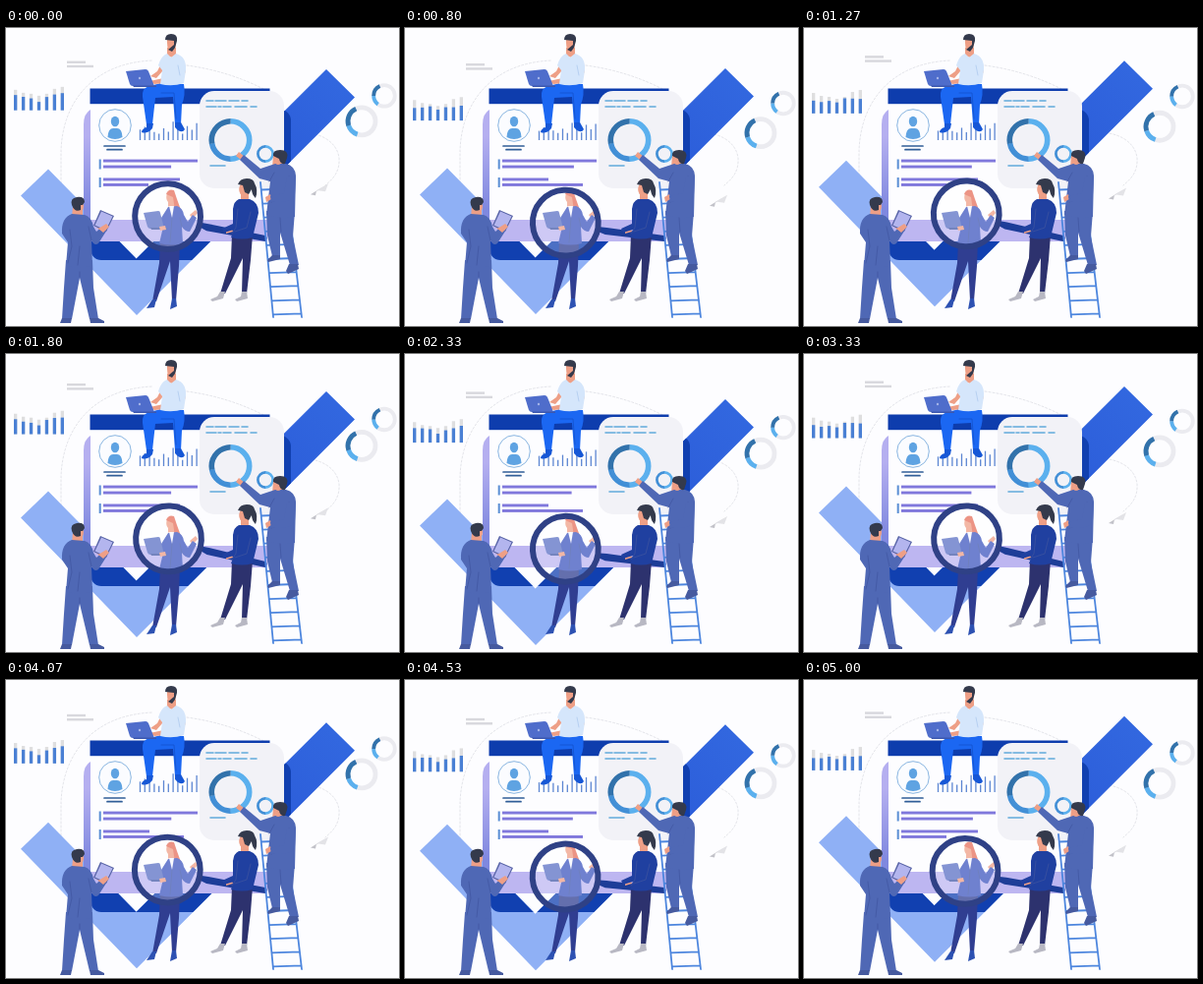
An HTML page for the animation above (5070 ms loop, 400 px wide and 303 px high).

```html
<!DOCTYPE html>
<html lang="en">
<head>
<meta charset="utf-8">
<title>Data analysis team</title>
<style>
html, body { margin: 0; width: 100%; height: 100%; overflow: hidden; background: #fdfdff; }
svg { display: block; width: 100vw; height: 100vh; }
.line { fill: none; stroke-linecap: round; stroke-linejoin: round; }
.skin { fill: #ee9f86; }
.hair { fill: #343a4c; }
.suit { fill: #4f68b5; }
.shoe { fill: #465a9f; }
.fold { fill: none; stroke: #40559f; stroke-width: .7; stroke-linecap: round; }
</style>
</head>
<body>
<svg viewBox="0 0 400 303" preserveAspectRatio="none">
  <defs>
    <linearGradient id="blue" gradientUnits="userSpaceOnUse" x1="133" y1="263" x2="340" y2="56">
      <stop offset=".25" stop-color="#8fb0f5"/><stop offset=".6" stop-color="#2b5cd9"/>
      <stop offset="1" stop-color="#3267df"/>
    </linearGradient>
    <linearGradient id="edge" x1="0" y1="0" x2="0" y2="1">
      <stop offset=".2" stop-color="#b5aff0"/><stop offset=".75" stop-color="#7f88df"/>
    </linearGradient>
    <clipPath id="onCheck">
      <path id="checkShape" d="M15 168L43 141L132.6 232L326 39.5L355 68L133 289.5Z"/>
    </clipPath>
  </defs>

  <path class="line" stroke="#dcdde4" stroke-width=".8" stroke-dasharray="2 2"
    d="M56 166V126C57 76 88 35 150 33M184 38C214 42 241 51 264 63M291 106C320 104 337 116 339 132C340 147 332 154 325 160"/>

  <use id="check" href="#checkShape" fill="url(#blue)"/>

  <g id="notes" fill="#d8d8dd">
    <rect x="62" y="33" width="19" height="2.4"/><rect x="62" y="37.2" width="27" height="2.4"/>
  </g>
  <g id="bars"></g>
  <g id="plane">
    <path fill="#e3e3e7" d="M310 174L328 163L325 171L318 170Z"/>
    <path fill="#c2c2c9" d="M310 174L328 163L316 170L315 175Z"/>
  </g>
  <g id="ringA"></g>
  <g id="ringB"></g>

  <!-- screen, casting its shadow on the check mark -->
  <g clip-path="url(#onCheck)">
    <rect x="86" y="83" width="204" height="153" rx="11" fill="#1140b0"/>
  </g>
  <path fill="url(#edge)" d="M86 83Q79 87 79 98V202Q79 214 88 217H100V83Z"/>
  <path fill="#bdb6f1" d="M86 194H266V217H88Q86 216 86 212Z"/>
  <path fill="#fdfdff" d="M86 77H268V195H86Z"/>
  <rect x="85.5" y="61.5" width="183" height="15.7" fill="#0e3dad"/>

  <circle cx="111" cy="99" r="16.3" fill="#fbfcff" stroke="#6ba2d8" stroke-width=".8"/>
  <ellipse cx="111" cy="95" rx="4.2" ry="5.2" fill="#5fa3e2"/>
  <path fill="#5fa3e2" d="M103.5 111Q104 102 109 102H113Q118 102 118.5 111Q111 115 103.5 111Z"/>
  <path class="line" stroke="#315e98" stroke-width="1.7" stroke-linecap="butt" d="M100 120H121M103 123.7H118"/>

  <g id="ticks" stroke="#5c86d2" stroke-width="1.3"></g>
  <path stroke="#5b8fd5" stroke-width="2" d="M95.7 133.5V143.5M95.7 152V162"/>
  <g id="rows" fill="#8078dc"></g>

  <rect x="197" y="64" width="86" height="99" rx="15" fill="#f2f2f7"/>
  <path class="line" stroke="#62aadb" stroke-width="1.6" stroke-linecap="butt"
    d="M204 74H211M213 74H224M227 74H237M240 74H246M204 80H214M216 80H219M221 80H229M233 80H245M249 80H255M208 140H223"/>
  <g id="ringC"></g>
  <g id="ringD"></g>

  <!-- seated man -->
  <g>
    <path fill="#1b67f2" d="M181 57Q183 68 179 78L178 98H172L170 70L152 71L149 98H143L139 70Q138 61 146 59L158 56Z"/>
    <path class="line" stroke="#1452cc" stroke-width=".8" d="M158 66H171L173 92"/>
    <path fill="#1657d6" d="M143 97H150L149 102Q144 108 138 106Q138 103 143 101ZM172 96H178L182 103Q180 107 175 104L172 101Z"/>
    <path class="skin" d="M164 20H173V28Q168 32 164 27ZM180 40L183 42Q182 52 173 55L151 57L146 54L170 49ZM158 36L160 43L153 51L147 49L154 44Z"/>
    <path fill="#d5e6fb" d="M164 26Q158 28 155 38L159 43L157 57Q169 60 181 56L183 43Q184 29 173 26L168 30Z"/>
    <path class="line" stroke="#a9c6ec" stroke-width=".7" d="M175 38L177 48"/>
    <path class="skin" d="M164 12H173Q174 21 169 24Q164 24 164 15Z"/>
    <path class="hair" d="M162 12Q162 6 168 6Q175 6 174 13L172 20L169 24L165 22L171 17V13Z"/>
    <path fill="#4f6dcb" d="M122 44L142 42Q144 42 145 44L151 59H129Q127 59 126 57Z"/>
    <path fill="#3c57ae" d="M129 58.5H153V60H130Z"/>
    <circle cx="136" cy="51" r="1.2" fill="#a3b4e8"/>
  </g>

  <!-- left man -->
  <g>
    <path class="suit" d="M61 236H88L89 264L94 296H85L75 254L67 296H57L59 264Z"/>
    <path class="shoe" d="M57 295H67L66 300H55ZM85 295H94L100 298V300H86Z"/>
    <path class="skin" d="M68 181H78V193H67ZM90 200L104 195L106 199L97 207Z"/>
    <path class="suit" d="M67 189L80 190Q87 192 89 202L92 207L99 201L103 205L94 219Q90 222 87 216L88 242Q74 245 61 242L63 218L57 209Q56 193 67 189Z"/>
    <path class="fold" d="M65 205L67 222L63 239M87 216L84 202M75 222L73 241M75 248V253"/>
    <path fill="#5763a6" d="M96 185L110 191L102 207L89 201Z"/>
    <path fill="#b3b5ee" d="M97 186.5L108.5 191.5L101.5 205.5L90.5 200.5Z"/>
    <path class="skin" d="M94 204L102 199L105 202L99 208Z"/>
    <ellipse class="skin" cx="74" cy="181" rx="5" ry="7"/>
    <path class="hair" d="M67 180Q65 173 72 172Q80 171 80 177L78 180L76 180V185Q70 188 67 180Z"/>
  </g>

  <!-- woman behind the lens -->
  <g>
    <path fill="#303e91" d="M157 217H177L176 242L173 277H169L167 237L153 278H149L156 239Z"/>
    <path fill="#2d51b2" d="M149 276H153L151 284L143 285ZM169 275H173L174 283L167 286Z"/>
    <path class="skin" d="M164 168H172V181Q168 185 165 181V177Q162 174 164 168ZM187 190L193 185L195 188L190 194Z"/>
    <path fill="#e5705c" d="M163 169Q165 163 171 165L174 174L178 185L172 186L170 172Z"/>
    <path fill="#3f57bf" d="M165 182L174 181Q180 183 181 190L185 197L190 190L194 193L187 207Q182 207 179 202L180 219Q169 222 156 219L160 202L150 205L149 201L158 193Z"/>
    <path fill="#f7f8ff" d="M166 181L171 181L169 193Z"/>
    <path class="fold" d="M169 193L167 218M179 202L177 193"/>
    <path fill="#5a70c4" d="M140 188L155 186Q157 186 157 188L161 204H147Q145 204 144 202Z"/>
    <path fill="#455aa8" d="M147 203H164V205H148Z"/>
    <path class="skin" d="M156 202L162 201L163 205L157 206Z"/>
  </g>
  <g id="lens">
    <path fill="#1d3d98" d="M199 199L206 200L264 211Q267 213 264 217L204 207L198 204Z"/>
    <circle cx="164.3" cy="193" r="33.4" fill="#fff" fill-opacity=".25" stroke="#2f4186" stroke-width="6"/>
  </g>

  <!-- woman with the handle -->
  <g>
    <path fill="#2d326e" d="M230 210H251L249 236L245 270H240L241 234L223 270H218L229 234Z"/>
    <path fill="#b8b8c3" d="M218 268H223L221 275L210 278L208 276L215 273ZM240 268H245L246 275L235 278L233 276L239 273Z"/>
    <path class="skin" d="M239 163H247V176H239ZM224 205L229 202L231 207L224 209Z"/>
    <path fill="#2040a0" d="M237 174L248 174Q257 177 257 188L251 213Q240 216 229 213L232 205L222 208L220 204L231 199L231 184Q232 176 237 174Z"/>
    <path class="fold" d="M236 184L234 203L230 209M249 187L245 203L233 207"/>
    <ellipse class="skin" cx="241" cy="164" rx="3.8" ry="6"/>
    <path class="hair" fill="#1f2c48" d="M236 159Q238 153 245 153Q252 153 253 158Q257 165 254 173Q250 169 250 164L247 169L243 167L241 160Z"/>
  </g>

  <!-- ladder and climber -->
  <path class="line" id="ladder" stroke="#4d86de" stroke-width="1.8"/>
  <g>
    <path class="suit" d="M265 186H294L292 212L298 241H289L279 208L279 232H271L266 211Z"/>
    <path class="shoe" d="M271 231H279V235L267 238L266 236ZM288 240H297L298 245L287 250L285 247Z"/>
    <path class="skin" d="M272 130H282V142H271ZM234 130L237 126L243 131L243 137Z"/>
    <path class="suit" d="M274 138L285 138Q294 140 295 150L294 192Q278 195 265 190L269 156L258 153L238 134L242 129L259 143Z"/>
    <path class="fold" d="M268 156L273 147M288 151L285 172L270 177M279 193L280 207"/>
    <path class="skin" d="M264 172L269 169L270 174L265 177Z"/>
    <path class="suit" d="M286 151H295L294 169Q292 176 285 176L270 177L269 171L283 168Z"/>
    <ellipse class="skin" cx="277" cy="132" rx="5" ry="7"/>
    <path class="hair" d="M272 130Q271 124 279 124Q288 124 286 132L284 138Q279 139 278 133Z"/>
  </g>
</svg>
<script>
const LOOP = 5070, STEP = LOOP / 76;
const $ = id => document.getElementById(id);
const NS = "http://www.w3.org/2000/svg";

function add(parent, tag, attrs) {
  const el = document.createElementNS(NS, tag);
  for (const k in attrs) el.setAttribute(k, attrs[k]);
  parent.appendChild(el);
  return el;
}

// Each arc is [start, end, colour], as fractions of a full turn from the top.
function ring(id, cx, cy, r, width, arcs) {
  const len = 2 * Math.PI * r;
  for (const [a, b, stroke] of arcs) {
    add($(id), "circle", {
      cx, cy, r, fill: "none", stroke, "stroke-width": width,
      "stroke-dasharray": `${(b - a) * len} ${len}`,
      transform: `rotate(${a * 360 - 90} ${cx} ${cy})`
    });
  }
}

const GREY = "#ebebf0", DARK = "#3272ab", MID = "#428fd6", LIGHT = "#5bb0ee";
ring("ringA", 362, 100, 14, 4.8, [[0, 1, GREY], [.55, .7, LIGHT], [.7, .93, DARK]]);
ring("ringB", 385, 71.5, 10.8, 3.8, [[0, 1, GREY], [.6, .75, LIGHT], [.75, .93, DARK]]);
ring("ringC", 228.5, 114, 19.2, 5.6, [[0, .5, LIGHT], [.5, .72, MID], [.72, 1, DARK]]);
ring("ringD", 264, 128, 7.6, 2.7, [[0, .5, LIGHT], [.5, 1, MID]]);

const tops = [67, 70, 71, 73, 71, 66, 64];
const bars = tops.map((top, i) => {
  const x = 8 + i * 7.95;
  add($("bars"), "rect", { x, y: top, width: 3.3, height: 87.8 - top, fill: "#dededf" });
  return add($("bars"), "rect", { x, width: 3.3, fill: "#4a80d4" });
});

const ticks = [10, 13, 17, 9, 7, 12, 8, 18, 13, 7, 15, 11, 17].map((h, i) => {
  const x = 136.5 + i * 4.8;
  return { h, el: add($("ticks"), "line", { x1: x, x2: x, y2: 114 }) };
});

const rows = [133.6, 139.6, 152.5, 158].map(y =>
  add($("rows"), "rect", { x: 99, y, height: 2.9 }));

let d = "M259 157L272 294M285 157L301 294";
for (let y = 164; y < 294; y += 14.1) {
  const k = (y - 157) / 137;
  d += `M${259 + 13 * k} ${y + .5}L${285 + 16 * k} ${y - .5}`;
}
$("ladder").setAttribute("d", d);

// Two-second sway; peak is the moment of the lowest position.
const wave = (t, peak) => Math.cos(Math.PI * (t - peak));
const floats = [
  ["check", .37, 6.6], ["checkShape", .37, 6.6], ["notes", .47, 6], ["bars", .72, 6.5],
  ["plane", .74, 7], ["ringA", .78, 6.7], ["ringB", .65, 5.7]
];

function draw(now) {
  const t = Math.floor(((now + 6) % LOOP) / STEP) * STEP / 1000;
  for (const [id, peak, size] of floats) {
    if (id !== "check")
      $(id).setAttribute("transform", `translate(0 ${size * wave(t, peak)})`);
  }
  // The lens swings about the far end of its handle.
  $("lens").setAttribute("transform", `rotate(${-4 * wave(t, .565)} 264 214)`);

  bars.forEach((bar, i) => {
    const h = 13 + [1, 0, 0, -3, 1, 2, 3][i] + 1.5 * wave(t, i * .35);
    bar.setAttribute("y", 87.8 - h);
    bar.setAttribute("height", h);
  });
  ticks.forEach(({ h, el }, i) =>
    el.setAttribute("y1", 114 - h - .7 * wave(t, i * .3)));

  const swapped = wave(t, 1.5) < -.05;
  const widths = [96, 71 + 2 * wave(t, .9), swapped ? 47 : 78, swapped ? 82 : 46];
  rows.forEach((row, i) => row.setAttribute("width", widths[i]));
}

const start = performance.now();
function tick() {
  draw(performance.now() - start);
  requestAnimationFrame(tick);
}
tick();
</script>
</body>
</html>
```
